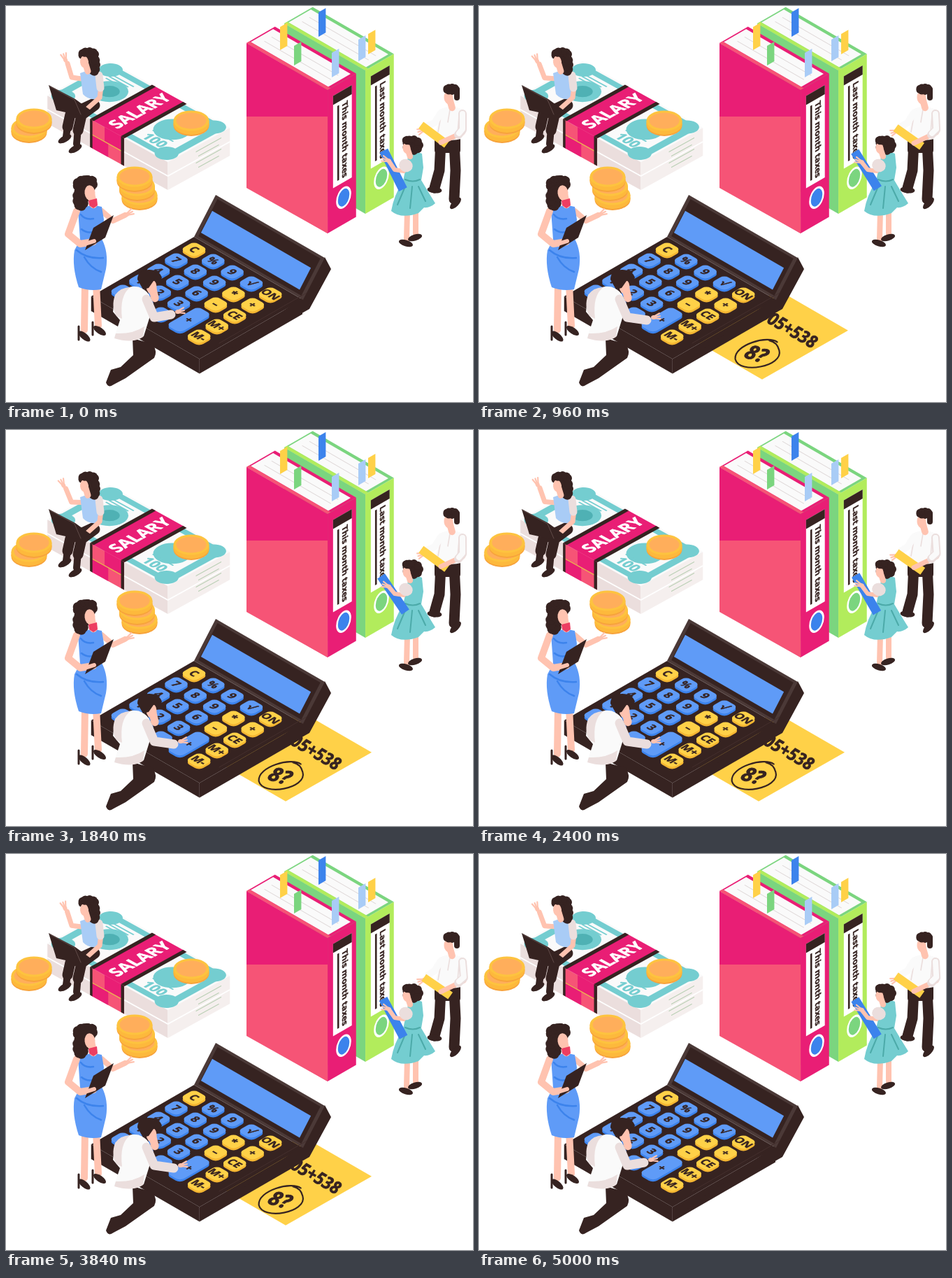
These frames come from a looping animation (668 by 566 pixels, 5040 ms). An HTML page with a canvas:

```html
<!DOCTYPE html>
<html lang="en">
<head>
<meta charset="utf-8">
<title>Accounting</title>
<style>
html, body { margin: 0; width: 100%; height: 100%; overflow: hidden; background: #fff; }
canvas { display: block; }
</style>
</head>
<body>
<canvas id="stage" width="668" height="566"></canvas>
<script>
const ctx = document.getElementById('stage').getContext('2d');
const LOOP = 5040, SWAY = 1340, TAU = 2 * Math.PI;
const C = {
  dark: '#362321', panel: '#4b3937', pink: '#e91e75', coral: '#f65476',
  blue: '#5f9bf7', deep: '#3c83ec', pale: '#a9ccf6', yellow: '#ffd148',
  amber: '#f4b632', gold: '#fdb93c', orange: '#ffae5b', green: '#7bd57f',
  lime: '#b2ec5c', teal: '#74cdd0', skin: '#ffc3b0', shade: '#ebdedd',
  light: '#f5efee', white: '#fafafa'
};

// The planes of an isometric view; rise / run sets how steep the floor is.
function planes(run, rise) {
  return {
    floor: [run, rise, -run, rise], top: [run, rise, run, -rise],
    left: [run, rise, 0, 1], right: [run, -rise, 0, 1], across: [run, -rise, run, rise]
  };
}
const ISO = planes(.866, .5), FLAT = planes(.87, .48);

const lerp = (a, b, k) => a + (b - a) * k;
function smooth(t, from, to) {
  const k = Math.max(0, Math.min(1, (t - from) / (to - from)));
  return k * k * (3 - 2 * k);
}

function on(axes, x, y, draw) {
  ctx.save();
  ctx.transform(...axes, x, y);
  draw();
  ctx.restore();
}
function turn(x, y, angle, draw) {
  on([Math.cos(angle), Math.sin(angle), -Math.sin(angle), Math.cos(angle)], x, y, draw);
}
function rect(color, x, y, w, h, radius = 0) {
  ctx.fillStyle = color;
  ctx.beginPath();
  ctx.roundRect(x, y, w, h, radius);
  ctx.fill();
}
function shape(color, path) {
  ctx.fillStyle = color;
  ctx.fill(new Path2D(path));
}
function line(color, width, path) {
  ctx.strokeStyle = color;
  ctx.lineWidth = width;
  ctx.lineCap = ctx.lineJoin = 'round';
  ctx.stroke(new Path2D(path));
}
function oval(color, x, y, rx, ry = rx, angle = 0) {
  ctx.fillStyle = color;
  ctx.beginPath();
  ctx.ellipse(x, y, rx, ry, angle, 0, TAU);
  ctx.fill();
}
function text(string, x, y, size, color, font = 'bold') {
  ctx.font = `${font} ${size}px "Noto Sans", "Open Sans", sans-serif`;
  ctx.textAlign = 'center';
  ctx.fillStyle = ctx.strokeStyle = color;
  ctx.lineWidth = size * .03;
  ctx.fillText(string, x, y + size * .36);
  ctx.strokeText(string, x, y + size * .36);
}
function slab(view, x, y, w, d, h, top, left, right) {
  const [run, rise] = view.floor;
  on(view.left, x - d * run, y + d * rise, () => rect(left, 0, 0, w, h));
  on(view.right, x + (w - d) * run, y + (w + d) * rise, () => rect(right, 0, 0, d, h));
  on(view.floor, x, y, () => rect(top, 0, 0, w, d));
}

function coin(x, y) {
  oval('#f7a33c', x, y + 7, 25.5, 15);
  rect(C.gold, x - 25.5, y, 51, 6);
  oval(C.gold, x, y + 5, 25.5, 15);
  oval('#fdc33f', x, y, 25.5, 14.5);
  oval(C.orange, x, y, 21.5, 11.5);
}
function coins(x, y, count, shift) {
  for (let i = count - 1; i >= 0; i--) coin(x + i * shift, y + i * 13);
}

function money() {
  const x = 148, y = 79, w = 198, d = 102, h = 40, bandAt = 72, band = 54;
  slab(FLAT, x, y, w, d, h, C.white, C.shade, C.light);
  on(FLAT.floor, x, y, () => {
    rect(C.teal, 3, 3, w - 6, d - 6);
    rect(C.white, 14, 12, w - 28, d - 24);
    for (const u of [14, w - 14]) for (const v of [12, d - 12]) oval(C.teal, u, v, 14);
    oval(C.teal, 45, 45, 22);
    oval('#4fb1b4', 45, 45, 12);
    oval(C.teal, 153, 50, 22);
    for (let i = 0; i < 3; i++) rect(C.teal, 22, 17 + i * 5, 36 - i * 4, 2);
    text('100', 155, 80, 19, C.teal);
    rect(C.teal, 138, 66, 34, 2);
  });
  on(FLAT.left, x - d * .87, y + d * .48, () => {
    rect('#fff', 0, h / 2 - 1, w, 2);
    rect(C.coral, bandAt, 0, band, h);
    rect(C.pink, bandAt + 22, 0, band - 22, h / 2);
    rect(C.pink, bandAt, h / 2, 28, h / 2);
    rect('#e9b64f', bandAt, h / 2, band, 1.5);
    rect(C.dark, bandAt - 2, 0, 4, h);
    rect(C.dark, bandAt + band - 5, 0, 5, h);
  });
  on(FLAT.right, x + (w - d) * .87, y + (w + d) * .48, () => {
    rect('#fff', 0, h / 2 - 1, d, 2);
    for (let i = 0; i < 4; i++) rect('#b9cfb4', 46 + i % 2 * 4, 7 + i * 8, 42 - i % 2 * 8, 1.3);
  });
  on(FLAT.floor, x, y, () => {
    rect(C.pink, bandAt, 0, band, d);
    rect(C.dark, bandAt - 2, 0, 6, d);
    rect(C.dark, bandAt + band - 5, 0, 6, d);
  });
  on(FLAT.across, 191, 150, () => text('SALARY', 0, 0, 24, '#fff'));
}

function binder(x, y, title, cover, rim, spine, ring) {
  const w = 134, d = 47, h = 205;
  on(ISO.left, x, y, () => rect(cover, 0, 0, w, h));
  on(ISO.top, x, y, () => {
    rect(cover, 0, 0, w, d);
    rect(C.white, 2, 5, w - 6, d - 10);
    for (let i = 1; i < 3; i++) rect('#dcd5d5', 12, 5 + i * 12, w - 24, 1);
    rect(rim, 0, 0, w, 5);
  });
  on(ISO.right, x + w * .866, y + w * .5, () => {
    rect(spine, 0, 0, d, h);
    rect('#fff', 9, 13, 31, 132);
    rect(C.dark, 9, 13, 31, 13);
    rect(C.dark, 16, 31, 3, 107);
    oval('#fff', 26.5, 167, 12.5, 15);
    oval(ring, 26.5, 167, 9.5, 12);
    turn(29, 85, TAU / 4, () => text(title, 0, 0, 12.6, C.dark));
  });
}
function tab(color, x, y, h) {
  on(ISO.right, x, y, () => rect(color, 0, 0, 12, h));
}
function binders() {
  binder(398, 25, 'Last month taxes', C.green, C.lime, C.lime, C.green);
  binder(344, 53, 'This month taxes', C.pink, C.coral, C.pink, C.deep);
  ctx.save();
  ctx.clip(new Path2D('M344 158H460V325L344 260Z'));
  rect(C.coral, 344, 158, 116, 170);
  ctx.restore();
  tab(C.yellow, 392, 30, 33);
  tab(C.green, 412, 57, 28);
  tab(C.deep, 447, 9, 35);
  tab(C.pale, 466, 67, 35);
  tab(C.pale, 504, 48, 31);
  tab(C.yellow, 518, 40, 29);
}

function note(t) {
  const enter = t < 800 ? lerp(130, -6.5, smooth(t, 0, 800)) : lerp(-6.5, 0, smooth(t, 800, 1300));
  const back = enter + 130 * smooth(t, 3920, 4640);
  if (back > 76) return;
  ctx.save();
  ctx.translate(-back, -back * .59);
  on([.866, .5, -.866, .493], 423, 403, () => rect(C.yellow, 0, 0, 115.5, 142));
  on([.83, .48, -.55, .9], 438, 457, () => text('605+538', 0, 0, 24, C.dark, 'italic 600'));
  on([.94, .28, -.5, .85], 392, 494, () => text('8?', 0, 0, 30, C.dark, 'italic 600'));
  turn(393, 495, -.15, () => line(C.dark, 2.2, 'M31 -13C20 -25 -31 -19 -32 2C-30 25 35 23 32 -1Q31 -13 20 -17'));
  ctx.restore();
}

function key(string, row, col, gold, rows = 1) {
  const x = 269 + 27.3 * col - 25.5 * row, y = 348 + 16 * col + 15 * row;
  const more = (rows - 1) * 29.5;
  const face = (color, drop) => on(ISO.floor, x, y + drop, () => rect(color, -11.5, -11.5, 23, 23 + more, 7));
  face(gold ? C.amber : C.deep, 3);
  face(gold ? C.yellow : C.blue, 0);
  on(ISO.floor, x, y, () => text(string, 0, more / 2, 15, C.dark));
}
function calculator() {
  slab(ISO, 269, 330, 179, 170, 21, C.dark, C.dark, C.dark);
  shape(C.dark, 'M456 359L465 376L434 433L277 522L424 416Z');
  on([.866, .5, -.31, .6], 300, 270, () => {
    rect(C.panel, 0, 0, 180, 100);
    rect(C.dark, 5, 6, 170, 88);
    rect(C.blue, 6, 33, 163, 52);
  });
  line('#442f2d', 1, 'M305 482L430 410');
  const columns = ['C741,', '%852.', '9963.', '√*–', ['ON', '÷', 'CE', 'M+', 'M-']];
  columns.forEach((column, col) => [...column].forEach((string, row) =>
    key(string, row, col, col === 4 || string === 'C' || col === 3 && row > 0)));
  key('+', 3, 3, false, 2);
}

// Hair as a ring of round curls.
function curls(x, y, rx, ry, r) {
  oval(C.dark, x, y, rx + r * .4, ry + r * .4);
  for (let i = 0; i < 9; i++) {
    const a = i / 9 * TAU;
    oval(C.dark, x + rx * Math.cos(a), y + ry * Math.sin(a), r);
  }
}
function face(x, y, r) {
  line(C.skin, r * 1.5, `M${x + 1} ${y}L${x + 5} ${y + r * 2.2}`);
  oval(C.skin, x, y, r, r * 1.45, -.1);
}
function shoe(x, y, angle) {
  oval(C.dark, x, y, 10.5, 4.5, angle);
}
function hand(x, y, angle) {
  turn(x, y, angle, () => {
    oval(C.skin, 0, 0, 4, 3);
    for (let i = -1; i < 2; i++) line(C.skin, 2.2, `M0 ${i}L9 ${i * 4}`);
  });
}

function sittingWoman(sway) {
  line(C.dark, 15, 'M124 140L92 155L88 173M127 142L108 156L103 178');
  line(C.dark, 10, 'M88 172L86 187M103 175L101 197');
  shoe(84, 190, -.5);
  shoe(99, 204, -.5);
  turn(104, 106, -.12 * (1 - sway) / 2, () => {
    line(C.skin, 7, 'M4 -2L-10 -4L-16 -24');
    hand(-19, -29, -1.9);
  });
  shape(C.pale, 'M106 96Q119 90 133 95L137 112L134 132Q119 136 110 126Z');
  line(C.skin, 7, 'M136 115L134 131L116 147');
  line(C.shade, 11, 'M133 99L135 117');
  curls(118, 69, 9, 4, 6);
  curls(126, 84, 3, 10, 6);
  face(112, 80, 6);
  curls(116, 67, 7, 2, 4);
  shape(C.dark, 'M61 113L99 133L121 149L108 157L72 149Z');
  line('#604a47', 1, 'M63 115L98 134L107 155');
}

function standingWoman() {
  line(C.skin, 10, 'M113 398L112 463M129 398L132 457');
  shoe(112, 472, .7);
  shoe(134, 464, .6);
  line(C.dark, 3, 'M104 458V477M124 452V470');
  line(C.skin, 8, 'M137 293L153 307L170 299');
  hand(173, 298, -.5);
  shape(C.blue, 'M103 291Q120 282 137 287L140 305L137 333Q147 352 143 376L136 405Q119 408 104 402Q94 372 98 349L106 334Z');
  line(C.deep, 2.5, 'M107 298Q113 306 125 304M108 319Q116 326 129 322M101 349Q116 362 139 360M112 359Q121 375 136 380');
  line(C.skin, 10, 'M101 293L89 326L106 340L125 337');
  curls(113, 255, 11, 6, 7);
  curls(107, 275, 5, 11, 7);
  face(120, 267, 7.5);
  curls(116, 249, 9, 2, 5);
  shape('#ed3e62', 'M118 278L130 275L131 285L125 289L119 285Z');
  shape(C.dark, 'M154 299L125 317L113 349L142 331Z');
  line(C.skin, 6, 'M110 341L126 336');
}

function crouchingMan(press) {
  shape(C.dark, 'M181 475L210 483Q217 494 212 503L171 532L154 541Q146 547 143 538L150 520L164 516L182 499Z');
  const x = lerp(246, 250, press), y = lerp(437, 445, press);
  hand(x, y, -.2);
  face(208, 401, 7.5);
  shape(C.white, 'M176 402Q193 397 205 413L207 440L197 472Q182 483 155 473L163 449L153 437Q154 414 176 402Z');
  shape(C.shade, 'M156 413Q164 402 178 402Q162 413 166 447L158 443Q150 430 156 413ZM157 468Q182 469 198 458L196 473Q181 483 155 475Z');
  line(C.shade, 13, `M201 419L212 445L${x - 10} ${y + 4}`);
  shape(C.dark, 'M188 391Q188 377 205 377Q219 377 223 388Q221 395 211 393L204 403L196 405Z');
}

function standingMan(tilt) {
  line(C.dark, 15, 'M622 193L620 235L613 260M641 194L643 235L641 276');
  rect(C.dark, 613, 184, 37, 26, 4);
  shoe(613, 263, .1);
  shoe(643, 282, -.8);
  shape(C.white, 'M620 148Q639 139 657 150L655 172L651 190Q631 195 613 185L618 168Z');
  line(C.shade, 1.6, 'M622 158L618 180M648 157L646 181M635 148L632 166');
  face(633, 131, 6.5);
  curls(637, 119, 7, 3, 5);
  line(C.dark, 8, 'M645 120L645 131');
  line(C.white, 10, `M622 153L613 167L604 ${171 + tilt * 2}`);
  hand(598, 177 + tilt * 3, 2.8);
  turn(lerp(612, 617, tilt), lerp(184, 190, tilt), lerp(.64, .6, tilt), () => rect(C.yellow, -23, -6, 46, 12));
  const elbow = 653 + tilt * 2;
  line(C.skin, 7, `M${elbow} 181L622 ${195 + tilt * 2}`);
  line(C.shade, 12, `M653 154L${elbow} 177L647 184`);
  line(C.white, 8, `M653 154L${elbow} 176L648 182`);
}

function girl(sway) {
  line(C.skin, 8, 'M574 294L573 333M586 294L586 325');
  shoe(572, 339, .3);
  shoe(585, 331, -.3);
  shape(C.teal, 'M575 216Q585 206 595 211L597 231L594 249Q604 266 614 282Q606 289 598 288L590 296Q565 305 551 293Q555 270 568 250Z');
  line('#4caaa9', 2, 'M571 258L560 284M581 258L578 289M590 258L600 279M571 248Q582 253 592 248');
  turn(555, 235, -.62 + .08 * (1 + sway), () => rect(C.deep, -7, -32, 13, 62));
  const drop = (1 - sway) * 1.5;
  line(C.skin, 6, `M569 236L556 234L548 ${222 + drop}`);
  hand(547, 221 + drop, 3.5);
  oval(C.shade, 572, 228, 10, 9, .5);
  curls(582, 199, 9, 8, 6);
  face(573, 203, 5.5);
  curls(576, 192, 5, 2, 4.5);
}

function frame(t) {
  const sway = Math.cos(TAU * t / SWAY);
  const tilt = t < 600 ? 0 : (1 - Math.cos(TAU * (t - 600) / SWAY)) / 2;
  const press = smooth(t, 0, 500) - smooth(t, 3960, 4440);
  rect('#fff', 0, 0, 668, 566);
  binders();
  money();
  coins(40, 161, 2, -7);
  coins(184, 244, 3, 3.5);
  coin(265, 164);
  sittingWoman(sway);
  note(t);
  calculator();
  standingWoman();
  crouchingMan(press);
  standingMan(tilt);
  girl(sway);
}

const start = performance.now();
function tick() {
  frame((performance.now() - start) % LOOP);
  requestAnimationFrame(tick);
}
tick();
</script>
</body>
</html>
```
